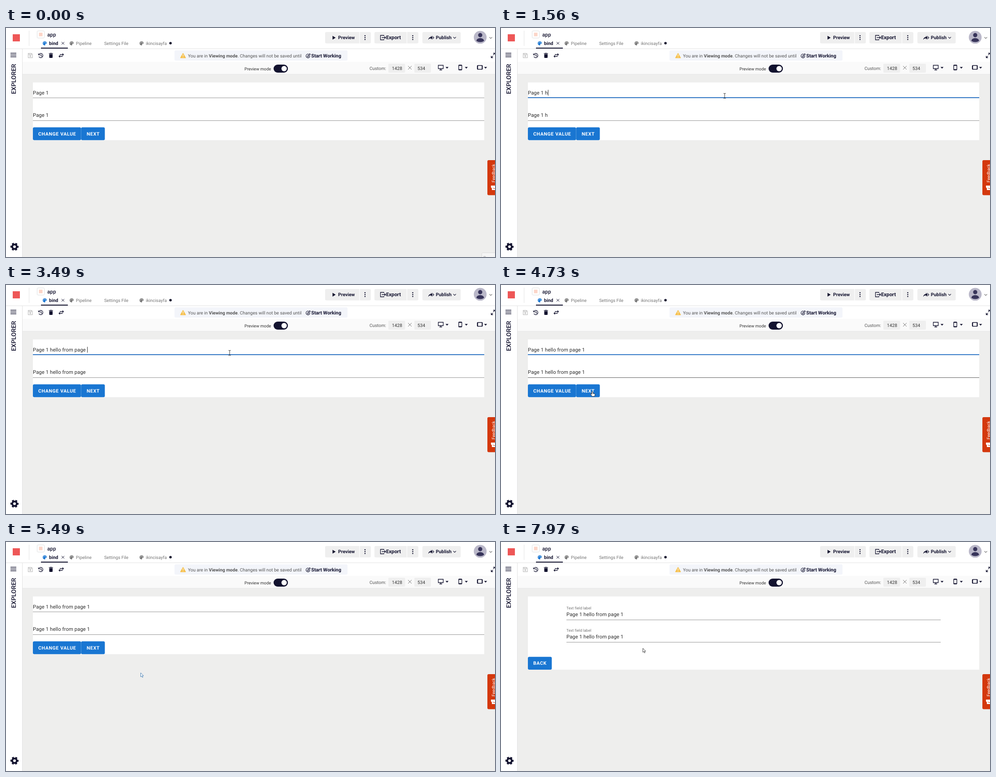
These frames come from a looping animation (1091 by 513 pixels, 8000 ms). An HTML page:

```html
<!DOCTYPE html>
<html lang="en">
<head>
<meta charset="utf-8">
<title>Text binding preview</title>
<style>
  html, body { margin: 0; width: 100%; height: 100%; overflow: hidden; background: #fff; }
  svg { display: block; width: 1091px; height: 513px; font-family: Roboto, sans-serif; text-rendering: geometricPrecision; --ink: #13132f; }
  .ink { fill: var(--ink); }
  .line { fill: none; stroke: var(--ink); stroke-width: 1.3; }
  .semi { font-weight: 600; fill: var(--ink); }
  .tab { font-size: 9.9px; fill: #777; }
  .grey { fill: #efefef; }
  .value { font-size: 11.28px; letter-spacing: .1px; fill: #2b2b2b; white-space: pre; }
  .label { font-size: 8.46px; letter-spacing: .05px; fill: #717171; }
  .button rect { fill: #1976d2; }
  .button text { font-size: 10.6px; font-weight: 600; letter-spacing: .6px; fill: #fff; }
  .rule { stroke: #949494; }
</style>
</head>
<body>
<svg viewBox="0 0 1091 513">
  <defs>
    <g id="palette">
      <path d="M0-4.6A4.6 4.6 0 0 0 0 4.6C1.6 4.6 1.2 3 1 2.5C.8 1.5 1.6 1.2 3 1.2C4.2 1.2 4.7.3 4.6-.6C4.3-3 2.3-4.6 0-4.6Z"/>
      <g fill="#fff"><circle cx="-2.7" cy="-.3" r=".8"/><circle cx="-1.3" cy="-2.5" r=".8"/><circle cx="1.3" cy="-2.5" r=".8"/><circle cx="2.8" cy="-.5" r=".8"/></g>
    </g>
    <g id="dots" class="ink"><circle cy="-4.3" r="1.3"/><circle r="1.3"/><circle cy="4.3" r="1.3"/></g>
    <path id="chevron" d="M-3-1.5L0 1.5L3-1.5" fill="none" stroke-width="1.1"/>
    <path id="drop" class="ink" d="M-3.3-1.7H3.3L0 1.9Z"/>
  </defs>

  <!-- Backgrounds -->
  <rect width="1091" height="513" fill="#fff"/>
  <rect x="37" y="76" width="1054" height="28" fill="#fafafa"/>
  <rect x="37" y="104" width="1054" height="409" fill="#eeeeed"/>
  <path d="M0 46.5H1091M36.5 47V513M51.5 6V40" stroke="#e2e2e2" fill="none"/>
  <path d="M37 103.5H1091" stroke="#e8e8e8"/>

  <!-- Title and tabs -->
  <rect x="15" y="14" width="16" height="16" fill="#ee5757"/>
  <rect x="69.5" y="6.5" width="16" height="16" rx="2" fill="#fff" stroke="#dedede"/>
  <rect x="73.5" y="10.5" width="8" height="8" fill="#fbd5c8"/>
  <text x="92" y="19" font-size="11.7" font-weight="500" class="ink">app</text>
  <use href="#palette" x="86.5" y="34.3" fill="#1976d2"/>
  <text x="96" y="38" font-size="10.5" class="semi">bind</text>
  <path d="M124 31.2L130 37.2M130 31.2L124 37.2" class="line" style="stroke-width:1"/>
  <rect x="78" y="44" width="60" height="2" class="ink"/>
  <use href="#palette" x="146.5" y="34.3" fill="#777"/>
  <text x="156" y="38" class="tab">Pipeline</text>
  <text x="219" y="38" class="tab">Settings File</text>
  <use href="#palette" x="302.5" y="34.3" fill="#777"/>
  <text x="312" y="38" class="tab" font-size="9.6">ikincisayfa</text>
  <circle cx="367" cy="34" r="2.8" class="ink"/>

  <!-- Header actions -->
  <g class="grey">
    <rect x="712" y="9" width="102" height="25.5" rx="3"/>
    <rect x="822" y="9" width="98" height="25.5" rx="3"/>
    <rect x="929" y="9" width="85.500" height="25.5" rx="3"/>
  </g>
  <path d="M788.700 9V34.500M894.500 9V34.500" stroke="#fff" stroke-width="1.2"/>
  <path d="M728.500 17.500V26L735.500 21.700Z" class="ink"/>
  <text x="741" y="25.300" font-size="10.400" class="semi">Preview</text>
  <use href="#dots" x="801" y="21.500"/>
  <path d="M843 18V16.500H835.500V26.500H843V25M838.500 21.500H847M844.500 19L847 21.500L844.500 24" class="line"/>
  <text x="848" y="25.300" font-size="11.300" class="semi">Export</text>
  <use href="#dots" x="907.500" y="21.500"/>
  <path d="M942 26.500C943 22 945 20.500 948 20.300V17.500L952 21.700L948 25.700V23C945.500 23 944 24 942 26.500ZM951 17.500L955.500 21.700L951 25.700L950.500 25L953.700 21.700L950.500 18.300Z" class="ink"/>
  <text x="959" y="25.300" font-size="10.400" class="semi">Publish</text>
  <use href="#chevron" x="1001" y="21.700" stroke="#13132f"/>
  <circle cx="1058" cy="20.800" r="14.300" fill="#bab8c9"/>
  <circle cx="1058" cy="16" r="4.700" fill="#37345a"/>
  <path d="M1049.500 29C1049.500 20.500 1066.500 20.500 1066.500 29Q1058 34 1049.500 29Z" fill="#37345a"/>
  <use href="#chevron" x="1081.500" y="22" stroke="#777"/>

  <!-- Toolbar -->
  <g fill="none" stroke="#c5c5c5" stroke-width="1.300">
    <path d="M49.500 57H57L59 59V66.500H49.500ZM51.500 57V60H56.500V57"/><circle cx="54.200" cy="63.200" r="1.200"/>
  </g>
  <path d="M73.500 59A4.800 4.800 0 1 1 73.300 64M72 57.500L73.200 60.500L76 59.800M78 58.500V62L80.500 63.300" class="line"/>
  <path d="M96.500 58.500H104V65.500Q104 67 102.500 67H98Q96.500 67 96.500 65.500ZM95.700 56.500H98.500L99 55.700H101.500L102 56.500H104.800V57.700H95.700Z" class="ink"/>
  <path d="M120 59.500H128M126 57.200L128.300 59.500L126 61.800M126.500 63.500H118.500M120.500 61.200L118.200 63.500L120.500 65.800" class="line"/>
  <rect x="376" y="50" width="386" height="23" rx="3" fill="#f3f5fa"/>
  <path d="M395 56.500L401 67H389Z" fill="#f6c04d" stroke="#f6c04d" stroke-linejoin="round"/>
  <path d="M395 59.500V63.300M395 64.500V65.800" stroke="#fff" stroke-width="1.200"/>
  <text x="406" y="66" font-size="10.050" fill="#555">You are in <tspan font-weight="600">Viewing mode</tspan>. Changes will not be saved until</text>
  <path d="M675 58.500A4.300 4.300 0 1 0 678 62.500M672.700 64.500L673.200 62.300L677.500 57.500L679 59L674.700 63.800Z" class="line" style="stroke-width:1.1"/>
  <text x="681" y="66.200" font-size="10.800" class="semi">Start Working</text>
  <path d="M1087 56.500H1091M1091 56.500L1087.300 60.300M1082.500 62.500V66.500H1086.500M1082.500 66.500L1086.300 62.700" class="line"/>

  <!-- Viewport controls -->
  <text x="532" y="94.800" font-size="9.450" fill="#333">Preview mode</text>
  <rect x="597" y="82" width="32" height="18" rx="9" class="ink"/>
  <circle cx="620.500" cy="91" r="6" fill="#fff"/>
  <text x="811" y="93.500" font-size="9.950" fill="#555">Custom:</text>
  <g class="grey"><rect x="853" y="80" width="37.500" height="20" rx="2"/><rect x="911" y="80" width="37" height="20" rx="2"/></g>
  <g font-size="10.200" fill="#333"><text x="861" y="93.500">1428</text><text x="918" y="93.500">534</text></g>
  <path d="M897 85L905 93M905 85L897 93" stroke="#777" stroke-width="1"/>
  <path d="M964.500 83.500H975.500V91H964.500ZM970 91V94M967 94H973" class="line"/>
  <rect x="1010" y="83" width="7" height="11" rx="1" class="line"/>
  <path d="M1010 84H1017M1010 93H1017" class="line"/>
  <rect x="1051.500" y="84" width="11.500" height="8.500" rx="1" class="line"/>
  <path d="M1052.500 84V92.500M1062 84V92.500" class="line"/>
  <use href="#drop" x="984" y="89"/><use href="#drop" x="1027" y="89"/><use href="#drop" x="1070" y="89"/>

  <!-- Sidebar -->
  <path d="M10 56.500H23M10 60.500H23M10 64.500H23" class="line" style="stroke-width:1.6"/>
  <text transform="translate(22 148) rotate(-90)" font-size="13.900" font-weight="500" class="ink">EXPLORER</text>
  <g transform="translate(19 490)" fill="none" stroke="#13132f">
    <circle r="5" stroke-width="4"/>
    <circle r="7.600" stroke-width="3" stroke-dasharray="4.200 3.758" stroke-dashoffset="2.100"/>
  </g>

  <!-- First page -->
  <g id="page1">
    <rect x="60" y="122" width="1007" height="129.300" fill="#fff"/>
    <text id="text1" x="60" y="149" class="value" xml:space="preserve"></text>
    <text id="text2" x="60" y="199" class="value" xml:space="preserve"></text>
    <path id="rule1" d="M60 156.500H1067" class="rule"/>
    <path id="rule2" d="M60 207.500H1067" class="rule"/>
    <rect id="focus" y="155.200" height="1.700" fill="#1668c4"/>
    <rect id="caret" y="138.500" width="1" height="13" fill="#222"/>
    <g class="button">
      <rect x="60" y="222.500" width="107.500" height="28.800" rx="3"/><text x="72" y="240.600">CHANGE VALUE</text>
      <rect id="next" x="167.500" y="222.500" width="53" height="28.800" rx="3"/><text x="180" y="240.600">NEXT</text>
    </g>
  </g>

  <!-- Second page -->
  <g id="page2">
    <rect x="60" y="122" width="1007" height="164" fill="#fff"/>
    <text x="146" y="150.500" class="label">Text field label</text>
    <text x="146" y="166" class="value">Page 1 hello from page 1</text>
    <text x="146" y="200.500" class="label">Text field label</text>
    <text x="146" y="216" class="value">Page 1 hello from page 1</text>
    <path d="M146 174.500H981M146 224.500H981" class="rule"/>
    <path id="oldCaret" d="M145.800 142.500V152" stroke="#666" stroke-width=".8"/>
    <g class="button"><rect x="60" y="257.200" width="53.300" height="28.800" rx="3"/><text x="72" y="275.200">BACK</text></g>
  </g>

  <!-- Feedback tab and corner hint -->
  <rect x="1074" y="296" width="24" height="78.500" rx="3" fill="#d4380d"/>
  <text transform="translate(1091.300 346) rotate(-90)" font-size="9.600" fill="#fff">Feedback</text>
  <path d="M1082 353H1091V363H1084V359L1082 357Z" fill="#fff"/>
  <path d="M1086 358Q1088 360.500 1091 359.500" fill="none" stroke="#d4380d"/>
  <g id="hint"><rect x="1061.500" y="503.500" width="40" height="20" rx="2" fill="#f5f5f5" stroke="#dcdcdc"/><text x="1065" y="517.500" font-size="9.500" fill="#999">Pause</text></g>

  <!-- Pointers, drawn around their hot spots -->
  <path id="beam" d="M-2.500-5.500H-.8L0-5L.8-5.500H2.500M0-5V5M-2.500 5.500H-.8L0 5L.8 5.500H2.500" fill="none" stroke="#333"/>
  <path id="arrow" d="M0 0V9L2.100 7.200L3.700 10.500L5.100 9.800L3.600 6.600H6.300Z" fill="#fff" stroke-width=".9"/>
  <path id="hand" d="M-1.200 6V.4Q0-1 1.200.4V4L5 4.800Q6 5.200 5.700 6.500L4.800 10.500H-.5L-3.400 6.700Q-3-.1 -1.200 6Z" fill="#fff" stroke="#222" stroke-width=".9"/>
</svg>
<script>
const LOOP = 8000, FOCUS = 810, BLUR = 4960, SWITCH = 7360;
const BASE = "Page 1", TYPED = " hello from page 1";
const keyTimes = [1360, 1560, 1680, 1800, 1920, 2030, 2150, 2350, 2450, 2550,
                  2750, 2880, 3080, 3150, 3350, 3420, 3490, 3760];
// Pointer moves: start, end, from x, from y, to x, to y
const moves = [
  [70, 670, 1075, 490, 499, 152],
  [4220, 4700, 499, 152, 204, 239],
  [4760, 5000, 204, 239, 206, 250],
  [5070, 5490, 206, 250, 300.500, 293],
  [7760, 7970, 300.500, 293, 316.500, 238],
];
const el = Object.fromEntries([...document.querySelectorAll("svg [id]")].map(e => [e.id, e]));
const clamp = v => Math.min(1, Math.max(0, v));
const ramp = (t, start, length) => clamp((t - start) / length);
const easeOut = p => 1 - (1 - p) ** 3;
const easeInOut = p => p * p * (3 - 2 * p);
const show = (name, on) => { el[name].style.display = on ? "" : "none"; };
const grey = v => `rgb(${v},${v},${v})`;

function pointerAt(t) {
  const [start, end, x0, y0, x1, y1] = moves.filter(m => t >= m[0]).pop() || moves[0];
  const p = easeInOut(ramp(t, start, end - start));
  return [x0 + (x1 - x0) * p, y0 + (y1 - y0) * p];
}

function drawPointer(t, x, y) {
  const onFirst = t < SWITCH, inRow = x > 60 && x < 1067;
  const overField = onFirst && inRow && (y > 134 && y < 158 || y > 184 && y < 208);
  const overButton = onFirst && x > 60 && x < 221 && y > 222 && y < 252;
  const shape = overField ? "beam" : overButton ? "hand" : "arrow";
  for (const name of ["beam", "hand", "arrow"]) show(name, t >= 70 && name === shape);
  el[shape].setAttribute("transform", `translate(${x} ${y})`);
  el.arrow.setAttribute("stroke", t > 5000 && t < 7760 ? "#3b78b0" : "#333");
}

function drawField(t) {
  const typed = keyTimes.filter(k => k <= t);
  const text = BASE + TYPED.slice(0, typed.length);
  el.text1.textContent = el.text2.textContent = text;

  const lastKey = typed.pop() || FOCUS;
  show("caret", t >= FOCUS && t < BLUR && (t - lastKey) % 1000 < 500);
  el.caret.setAttribute("x", 60.300 + el.text1.getComputedTextLength());

  const grown = easeOut(ramp(t, FOCUS, 200)) * (1 - easeOut(ramp(t, BLUR, 200)));
  el.focus.setAttribute("x", 563.500 - 503.500 * grown);
  el.focus.setAttribute("width", 1007 * grown);

  const hover1 = ramp(t, 560, 150) * (1 - ramp(t, 4300, 200));
  const hover2 = ramp(t, 4440, 150) * (1 - ramp(t, 4660, 200));
  el.rule1.style.stroke = grey(148 - 110 * hover1);
  el.rule2.style.stroke = grey(148 - 90 * hover2);
  const press = ramp(t, 4730, 250) * (1 - ramp(t, 5130, 250));
  el.next.style.fill = `rgb(${25 - 4 * press},${118 - 17 * press},${210 - 18 * press})`;
}

let start;
function frame(now) {
  start ??= now;
  const t = (now - start) % LOOP;
  show("hint", t < 70);
  show("page1", t < SWITCH);
  show("page2", t >= SWITCH);
  show("oldCaret", t < 7760);
  if (t < SWITCH) drawField(t);
  drawPointer(t, ...pointerAt(t));
  requestAnimationFrame(frame);
}
requestAnimationFrame(frame);
</script>
</body>
</html>
```
